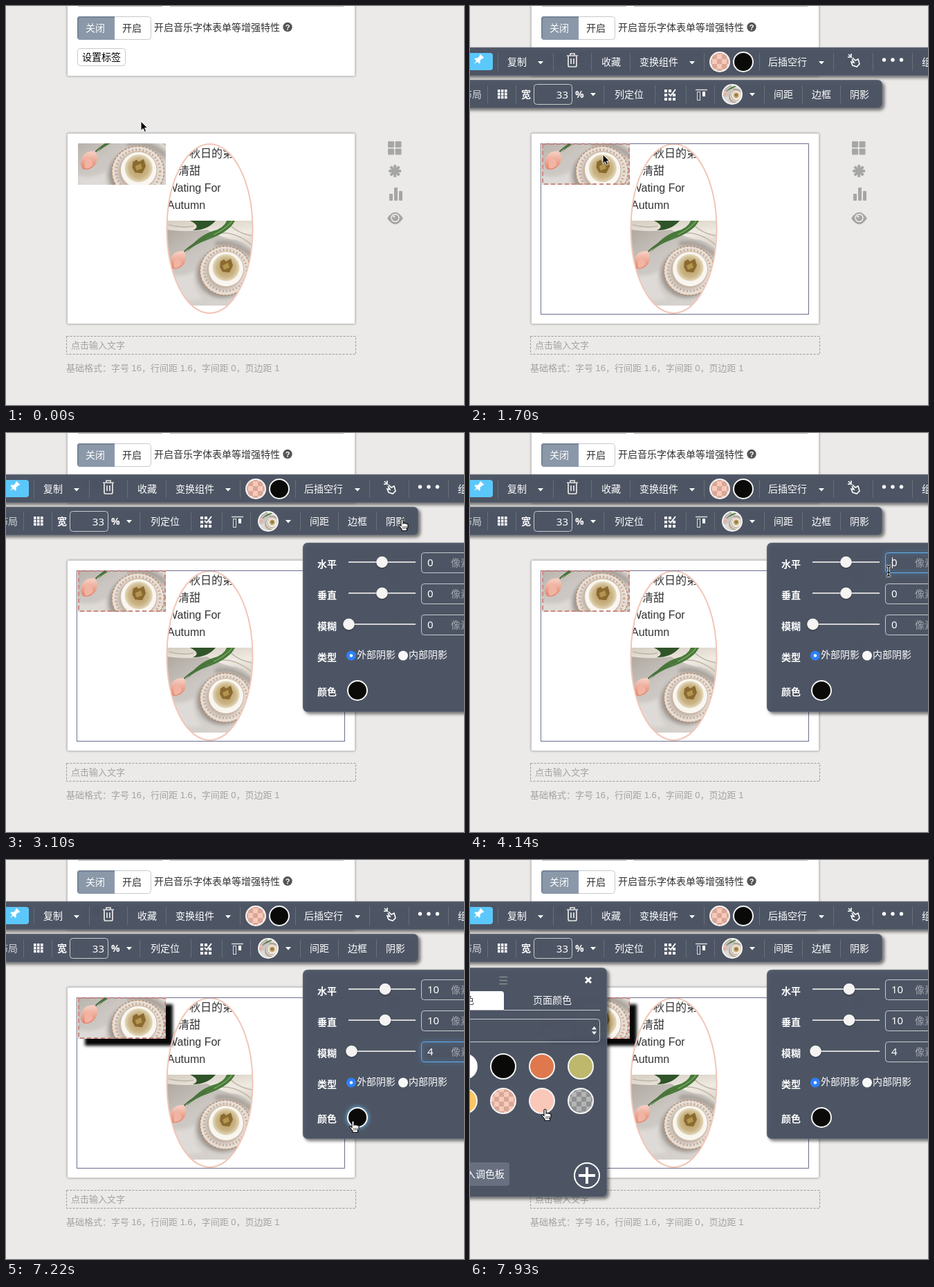
These frames come from a looping animation (662x578 px, 8000 ms). An HTML page:

```html
<!DOCTYPE html>
<html lang="zh-CN">
<head>
<meta charset="utf-8">
<style>
html, body { margin: 0; width: 100%; height: 100%; overflow: hidden; background: #ebeae8; }
svg { display: block; }
#stage { font: 14px "Liberation Sans", "Noto Sans CJK SC", sans-serif; fill: #333; }
.ui text { fill: #fff; font-family: "Noto Sans", "Noto Sans CJK SC", sans-serif; }
.ui .num { font-size: 15px; }
.ui .dim { fill: #a1a5ad; }
.ui .b { font-weight: 700; }
.bar { fill: #4c5464; fill-opacity: .965; stroke: #8b909a; stroke-width: .5; filter: drop-shadow(3px 3px 2px #0008); }
.card { fill: #fff; stroke: #c9cacc; stroke-width: 1; filter: drop-shadow(0 0 1.5px #0005); }
.focus { stroke: #62b0ee; filter: drop-shadow(0 0 3px #4aa8ff); }
.note { font-size: 13px; fill: #a3a3a1; }
</style>
</head>
<body>
<svg id="stage" width="662" height="578" viewBox="0 0 662 578"></svg>
<script>
const $ = id => document.getElementById(id);
const text = (x, y, s, attrs = '') => `<text x="${x}" y="${y}" ${attrs}>${s}</text>`;
const rect = (x, y, w, h, attrs = '') => `<rect x="${x}" y="${y}" width="${w}" height="${h}" ${attrs}/>`;
const dot = (x, y, r, attrs = '') => `<circle cx="${x}" cy="${y}" r="${r}" ${attrs}/>`;
const path = (d, attrs = '') => `<path d="${d}" ${attrs}/>`;
const many = (list, fn) => list.map(fn).join('');
const line = (d, color = '#fff', w = 1, more = '') => path(d, `fill="none" stroke="${color}" stroke-width="${w}" ${more}`);
const swatch = (x, y, r, fill) => dot(x, y, r, `fill="${fill}" stroke="#f4f4f4" stroke-width="2"`);
const caret = (x, y) => path(`M${x - 4} ${y}h8l-4 4.5z`, 'fill="#fff"');
const divider = (xs, y) => many(xs, x => line(`M${x} ${y}v26`, '#696e78'));
const field = (x, y, w, h, attrs = '') => rect(x, y, w, h, `rx="4" fill="none" stroke="#c6c9cf" ${attrs}`);
const photo = (x, y, w, h, top) =>
  `<svg x="${x}" y="${y}" width="${w}" height="${h}" viewBox="0 ${top} 123 ${123 * h / w}"><use href="#photo"/></svg>`;
const checker = (id, a, b) => `<pattern id="${id}" width="14" height="14" patternUnits="userSpaceOnUse">
  ${rect(0, 0, 14, 14, `fill="${a}"`)}${path('M0 0h7v14h7V7H0z', `fill="${b}"`)}</pattern>`;

const defs = `<defs>
  ${checker('pinkCheck', '#f6c9ba', '#d9a797')}${checker('grayCheck', '#b5b5b5', '#8f9092')}
  <linearGradient id="table" x2=".6" y2="1"><stop stop-color="#aaa39b"/><stop offset=".45" stop-color="#cbc6c1"/><stop offset="1" stop-color="#d6d2ce"/></linearGradient>
  <linearGradient id="cloth" x2=".3" y2="1"><stop stop-color="#d5cdc1"/><stop offset=".6" stop-color="#f0ebe3"/><stop offset="1" stop-color="#ddd6cc"/></linearGradient>
  <radialGradient id="tea"><stop stop-color="#b5965a"/><stop offset=".7" stop-color="#cbb587"/><stop offset="1" stop-color="#e4d9bd"/></radialGradient>
  <linearGradient id="petal" x2="0" y2="1"><stop stop-color="#f6d3c6"/><stop offset="1" stop-color="#e5826c"/></linearGradient>
  <filter id="soft"><feGaussianBlur stdDeviation="2.5"/></filter>
  <clipPath id="oval"><ellipse cx="294.5" cy="322.5" rx="62" ry="122.5"/></clipPath>
  <clipPath id="round">${dot(379, 128, 14)}</clipPath>
  <g id="photo">
    ${rect(0, 0, 123, 123, 'fill="url(#table)"')}
    ${path('M0 78Q24 84 40 72Q36 100 52 112Q30 120 0 108Z', 'fill="#dedad7" filter="url(#soft)"')}
    ${path('M70 30Q96 24 123 46V56Q100 32 68 37Z', 'fill="#8f867e" opacity=".6" filter="url(#soft)"')}
    ${path('M0 0H123V42Q108 27 92 27Q72 22 58 13Q28 17 0 13Z', 'fill="url(#cloth)"')}
    ${line('M76 18Q100 16 123 36M88 3Q100 18 123 22M2 6Q20 11 38 8', '#bfb5a8', 1.5)}
    ${path('M33 0H70Q58 14 37 14Q50 8 33 0Z', 'fill="#2f5429"')}
    ${path('M98 0Q90 16 60 27Q40 34 28 45Q44 22 66 15Q82 11 86 0Z', 'fill="#477a39"')}
    ${line('M94 0Q84 14 56 25', '#7da263', 1.5)}
    ${line('M19 51Q34 32 67 20', '#4d6f3f', 2)}
    ${path('M5 56Q8 43 24 44Q30 52 25 62Q17 72 7 69Q2 64 5 56Z', 'fill="url(#petal)"')}
    ${path('M12 52Q19 51 21 63Q15 70 10 68Q8 60 12 52Z', 'fill="#f1b4a2"')}
    <ellipse cx="80" cy="77" rx="37" ry="35" fill="#857c75" opacity=".65" filter="url(#soft)"/>
    <ellipse cx="84" cy="72.500" rx="36.5" ry="35.5" fill="#e6ded7" stroke="#b98e6b" stroke-width="1.5" stroke-dasharray="3 2"/>
    <ellipse cx="84" cy="72" rx="31" ry="30" fill="none" stroke="#c9ab92" stroke-width="3" stroke-dasharray="2 3"/>
    ${dot(82, 73, 27, 'fill="#a99a8d" opacity=".6" filter="url(#soft)"')}
    ${dot(85, 70, 25.5, 'fill="#f9f6f1" stroke="#cdb49b"')}
    ${dot(85, 68, 19.5, 'fill="url(#tea)"')}
    ${path('M77 59L82 56L85 59L92 55L95 65L90 75L80 74L76 67Z', 'fill="#8a6a30"')}
    ${path('M80 65L88 61L90 68L82 71Z', 'fill="#b39550"')}
  </g>
</defs>`;

const page = `
  ${rect(88.5, -20, 416, 121.5, 'class="card" rx="2"')}
  ${line('M104 .5H226M237 .5H488', '#bbb')}
  ${field(103.5, 15.5, 106, 33)}
  ${path('M107 15H157V49H107Q103 49 103 45V19Q103 15 107 15Z', 'fill="#8a98a9"')}
  ${line('M104 46V19Q104 16 107 16H157', '#758395', 2)}
  ${text(115, 37, '关闭', 'fill="#fff"')}${text(168, 37, '开启')}
  ${text(214, 36, '开启音乐字体表单等增强特性')}
  ${dot(407, 30.5, 6.7, 'fill="#555"')}${text(407, 34.5, '?', 'fill="#fff" font-size="11" font-weight="700" text-anchor="middle"')}
  ${field(103.5, 61.5, 69, 25)}${text(110, 79, '设置标签', 'fill="#000"')}
  ${rect(88.5, 184.5, 416, 276, 'class="card" rx="2"')}
  <g fill="#a6a6a4">
    ${many([[552, 196], [562.5, 196], [552, 206.5], [562.5, 206.5]], ([x, y]) => rect(x, y, 9, 9, 'rx="1"'))}
    ${many([0, 45, 90, 135], a => rect(560.2, 230, 4, 18, `rx="1" transform="rotate(${a} 562.2 239)"`))}
    ${rect(554, 272, 5, 10, 'rx="1"')}${rect(561, 263, 5, 19, 'rx="1"')}${rect(568, 268, 5, 14, 'rx="1"')}
    ${path('M551 307.5Q562.5 290 574 307.5Q562.5 325 551 307.5Z')}
    ${dot(562.5, 307, 6.2, 'fill="#ebeae8"')}${dot(562.5, 307, 4.6)}${dot(561, 305, 1.5, 'fill="#ebeae8"')}
  </g>
  ${rect(87.5, 478.5, 418, 26, 'fill="none" stroke="#999" stroke-dasharray="3 2"')}
  ${text(94, 496, '点击输入文字', 'class="note"')}
  ${text(87, 529, '基础格式：字号 16，行间距 1.6，字间距 0，页边距 1', 'class="note"')}
  ${rect(104, 199, 127, 60, 'id="shade" fill="#080808"')}
  ${photo(104, 199, 127, 60, 33)}
  <g clip-path="url(#oval)" font-size="16">
    ${many(['这个秋日的第一', '份清甜', 'Wating For', 'Autumn'], (s, i) => text(233, 218.5 + i * 25.2, s))}
    ${photo(233, 311, 123, 123, 0)}
  </g>
  <ellipse cx="294.5" cy="322.5" rx="62" ry="122.5" fill="none" stroke="#f1c6b7" stroke-width="2"/>
  ${rect(104.5, 199.5, 384, 246, 'id="hover" fill="none" stroke="#bbb" stroke-dasharray="3 2"')}
  <g id="picked" fill="none">
    ${rect(102.5, 199.5, 387, 247, 'stroke="#6b7090"')}
    ${rect(105, 200, 125, 58, 'stroke="#c8857d" stroke-width="2" stroke-dasharray="6 4"')}
  </g>`;

const toolbars = `<g id="tools" class="ui">
  ${rect(-10, 60, 690, 41, 'class="bar"')}
  ${divider([40.5, 120.5, 175.5, 231.5, 338.5, 418.5, 525.5, 582.5, 639.5], 68)}
  ${rect(-10, 68, 43, 25, 'rx="4" fill="#5bc8fb"')}
  ${path('M-3.5-8H3.5V-6L2.5-5V-1L5 1V3H1L0 9L-1 3H-5V1L-2.5-1V-5L-3.5-6Z', 'fill="#fff" transform="translate(12 78) rotate(45)"')}
  ${many([[54, '复制'], [190, '收藏'], [245, '变换组件'], [431, '后插空行'], [653, '组']], ([x, s]) => text(x, 86, s))}
  ${many([102, 321, 508], x => caret(x, 80))}
  ${line('M140 72H156M145 71V69H151V71M142 73V86Q142 88 144 88H152Q154 88 154 86V73M146 76V84M150 76V84', '#e8e8e8', 1.7)}
  ${swatch(361, 81, 14, 'url(#pinkCheck)')}${swatch(395, 81, 14, '#0a0a08')}
  ${line('M547 70L552 75M551 69V73M546 74H550M553 75L557 79L561 77L563 84L559 88L553 86L551 81L555 82L552 77', '#fff', 1.6)}
  ${many([598.5, 611, 623.5], x => dot(x, 78, 2.7, 'fill="#fff"'))}

  ${rect(-10, 107, 606, 41, 'class="bar" rx="7"')}
  ${divider([25.5, 66.5, 193.5, 267.5, 312.5, 353.5, 425.5, 480.5, 535.5], 115)}
  ${text(-11, 133, '布局', 'opacity=".75"')}
  ${many([0, 1, 2, 3, 4, 5, 6, 7, 8], i => rect(40 + i % 3 * 5, 121 + (i / 3 | 0) * 4.7, 3.6, 3.8, 'fill="#fff"'))}
  ${text(74, 133, '宽', 'class="b"')}${field(92.5, 113.5, 55, 29)}
  ${text(142, 133.5, '33', 'class="num" text-anchor="end"')}${text(152, 133, '%', 'class="b"')}
  ${many([178, 408], x => caret(x, 126))}
  ${many([[209, '列定位'], [439, '间距'], [494, '边框'], [549, '阴影']], ([x, s]) => text(x, 133, s))}
  ${many([[281, 121], [287, 121], [281, 127], [281, 133], [287, 133], [293, 133], [293, 127]], ([x, y]) => rect(x, y, 4, 4, 'fill="#fff"'))}
  ${line('M287 127L290 130L297 121', '#fff', 2)}
  ${line('M326 121.5H343', '#ddd', 1.5)}${rect(328.5, 124.5, 4, 12, 'fill="none" stroke="#ddd"')}${rect(336, 124, 4, 7, 'fill="#fff"')}
  <g clip-path="url(#round)">${photo(364, 113, 30, 30, 0)}</g>${swatch(379, 128, 14, 'none')}
</g>`;

const rows = [187, 232, 277];
const shadowPanel = `<g id="shadowPanel" class="ui">
  ${rect(429, 159, 270, 245, 'class="bar" rx="7"')}
  ${many(['水平', '垂直', '模糊', '类型', '颜色'], (s, i) => text(450, [195, 240, 285, 330, 380][i], s, 'class="b"'))}
  ${many(rows, (y, i) => `
    ${line(`M495 ${y}H592`, '#d4d4d4', 2)}
    ${dot(543.5, y, 8.3, `id="knob${i}" fill="#f5f4f2" filter="drop-shadow(0 1px 1px #0006)"`)}
    ${field(600.5, y - 13.5, 90, 29, `id="field${i}"`)}
    ${i == 2 ? rect(608, 268, 10, 19, 'id="selection" fill="#6f9fd0"') : ''}
    ${text(609, y + 6, '0', `id="value${i}" class="num"`)}${text(643, y + 6, '像素', 'class="dim"')}`)}
  ${rect(610, 180, 1, 16, 'id="caret" fill="#fff"')}
  ${dot(499, 322.5, 7, 'fill="#2f80f8"')}${dot(499, 322.5, 2.2, 'fill="#fff"')}
  ${dot(574, 322.5, 7, 'fill="#f8f8f8"')}
  ${text(507, 326, '外部阴影', 'font-weight="500"')}${text(582, 326, '内部阴影', 'font-weight="500"')}
  <g id="ink">${swatch(508, 373, 14, '#0a0a08')}</g>
</g>`;

const swatches = [['#fff', '#0a0a08', '#e0784d', '#bdb86c'], ['#fbc763', 'url(#pinkCheck)', '#fac8b8', 'url(#grayCheck)']];
const colorPanel = `<g id="colorPanel" class="ui">
  ${rect(-20, 156, 218, 332, 'class="bar" rx="7"')}
  ${line('M42.5 169.5H54M42.5 174.5H54M42.5 179.5H54', '#8b8d90', 1.5)}
  ${line('M167 170L175 178M175 170L167 178', '#fff', 3)}
  ${rect(-10, 190, 59, 30, 'rx="4" fill="#fff"')}${rect(-10, 217.5, 60, 4, 'fill="#4c5464"')}
  ${line('M49 217.5H188', '#c6c9cf')}
  ${text(-8, 208, '色', 'style="fill:#444"')}${text(91, 208, '页面颜色')}
  ${field(-10, 230.5, 197.5, 33)}
  ${path('M176 245.5h7l-3.5-4.5zM176 248.5h7l-3.5 4.5z', 'fill="#fff"')}
  ${many(swatches, (row, j) => many(row, (c, i) => swatch(-8 + 56 * i, 299 + 50 * j, 18, c)))}
  ${rect(-10, 438, 67, 34, 'rx="4" fill="#687080"')}${text(-6, 460, '入调色板')}
  ${dot(169, 457, 18, 'fill="none" stroke="#fff" stroke-width="2"')}
  ${line('M157 457H181M169 445V469', '#fff', 4)}
</g>`;

const beam = 'M-3.5-7.5Q0-7.5 0-5.5Q0-7.5 3.5-7.5M0-5.5V5.5M-3.5 7.5Q0 7.5 0 5.5Q0 7.5 3.5 7.5M-2 2H2';
const cursor = `<g id="cursor">
  <g id="arrow">${path('M0 0V13.5L3.2 10.6L5.3 15.4L7.6 14.4L5.5 9.8H9.8Z', 'fill="#000" stroke="#fff"')}</g>
  <g id="hand">${path('M-2 1.5Q-2 0-.5 0Q1 0 1 1.5V6Q2 4.8 3.3 6Q4.5 5.2 5.6 6.5Q8 6 8 8.5Q8.5 12 6.5 14V16.5H-1V14.5L-5 9.5Q-6 7.5-4 7.8L-2 9.5Z', 'fill="#fff" stroke="#111" stroke-width="1.2"')}
    ${line('M1 10V14M3.3 10V14M5.6 10V14', '#111', .8)}</g>
  <g id="beam">${line(beam, '#fff', 3.2)}${line(beam, '#111', 1.4)}</g>
</g>`;

$('stage').innerHTML = defs + page + toolbars + shadowPanel + colorPanel + cursor;

// start, end, steps, x, y, shape on arrival
const moves = [
  [630, 890, 4, 192, 215, 'arrow'],
  [1870, 2300, 6, 579, 118, 'hand'],
  [2570, 2570, 1, 573, 125, 'hand'],
  [3190, 3530, 5, 594, 170, 'arrow'],
  [3790, 3970, 3, 605, 197, 'beam'],
  [4140, 4140, 1, 605, 200, 'beam'],
  [4500, 4760, 4, 612, 227, 'beam'],
  [5200, 5460, 4, 616, 272, 'beam'],
  [5810, 5980, 3, 624, 273, 'beam'],
  [6600, 6860, 4, 565, 325, 'arrow'],
  [6950, 7130, 3, 502, 378, 'hand'],
  [7750, 7930, 3, 109, 361, 'hand'],
];

// Progress 0..1 in n jumps, the first at a and the last at b
const steps = (t, a, b, n) => t < a ? 0 : t >= b ? 1 : (Math.floor((t - a) / (b - a) * (n - 1) + 1e-6) + 1) / n;
const set = (id, attrs) => { for (const k in attrs) $(id).setAttribute(k, attrs[k]); };
const fade = (id, k) => set(id, { opacity: k, visibility: k ? 'visible' : 'hidden' });

function draw(t) {
  let x = 195, y = 167, shape = 'arrow';
  for (const [a, b, n, toX, toY, kind] of moves) {
    const k = steps(t, a, b, n);
    x += (toX - x) * k;
    y += (toY - y) * k;
    if (k > .7) shape = kind;
  }
  set('cursor', { transform: `translate(${x} ${y})` });
  for (const id of ['arrow', 'hand', 'beam']) fade(id, +(id == shape));

  fade('hover', +(t >= 800 && t < 1610));
  fade('picked', steps(t, 1610, 1700, 2));
  fade('tools', steps(t, 1610, 1700, 2));
  fade('shadowPanel', steps(t, 2840, 3100, 4));
  fade('colorPanel', steps(t, 7310, 7570, 4));

  const values = [t < 4230 ? 0 : 10, t < 5110 ? 0 : 10, t < 6430 ? 0 : 4];
  const focus = t < 3970 ? -1 : t < 4930 ? 0 : t < 5810 ? 1 : t < 7310 ? 2 : -1;
  values.forEach((v, i) => {
    $('value' + i).textContent = v;
    set('knob' + i, { cx: i < 2 ? 543.5 + v * .45 : 495.5 + v });
    set('field' + i, { class: i == focus ? 'focus' : '' });
  });
  fade('selection', +(focus == 2 && !values[2]));
  fade('caret', +(focus == 0 || focus == 1 && t < 5640));
  if (focus >= 0) set('caret', { x: values[focus] ? 618 : 610, y: rows[focus] - 7 });
  $('ink').style.filter = t >= 7130 && t < 7750 ? 'drop-shadow(0 0 3px #6cc4ff)' : '';

  set('shade', { x: 104 + values[0], y: 199 + values[1] });
  $('shade').style.filter = values[2] ? `blur(${values[2] / 2}px)` : '';
}

function tick() {
  draw(performance.now() % 8000);
  requestAnimationFrame(tick);
}
tick();
</script>
</body>
</html>
```
